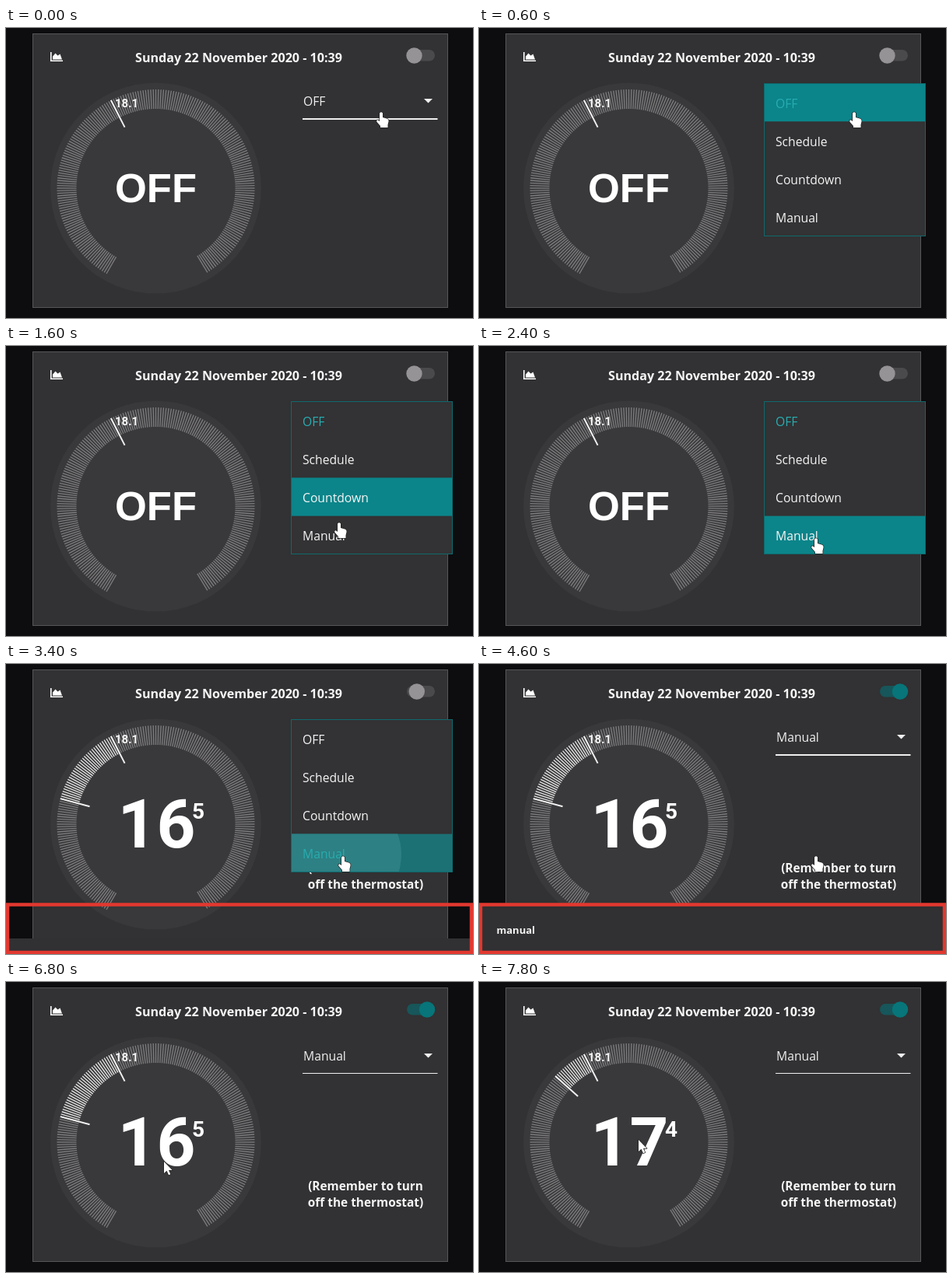
These frames come from a looping animation (600 by 373 pixels, 8 s). An HTML page with a canvas:

```html
<!DOCTYPE html>
<html lang="en">
<head>
<meta charset="utf-8">
<title>Thermostat</title>
<style>
html, body { margin: 0; height: 100%; overflow: hidden; background: #0d0c0e; }
canvas { display: block; width: 100vw; height: 100vh; }
</style>
</head>
<body>
<canvas id="stage" width="600" height="373"></canvas>
<script>
const ctx = document.getElementById('stage').getContext('2d');
const LOOP = 8000, STEP = 200;
const UI = '"Open Sans", sans-serif';
const LETTERS = '"Liberation Sans", Arial, sans-serif', DIGITS = 'Roboto, sans-serif';
const CX = 192.5, CY = 206;
const TICKS = 200, SWEEP = 300;
const AMBIENT = 18.1;
const ITEMS = ['OFF', 'Schedule', 'Countdown', 'Manual'];
const ROW = 49.2;

const HAND = new Path2D('M-2 1.5Q0-1 2 1.5V7L8 8.8Q9.8 9.6 9.6 12L8.5 16.5V20H-1V18L-5.6 12.8Q-6.4 10.4 -4.2 10.2L-2 12Z');
const ARROW = new Path2D('M0 0V15L3.5 11.8L6 17.3L8.4 16.2L6 11H10.6Z');
const CHART = new Path2D('M57 31h1.6v10.6H73V43H57ZM60 40.5V36.5L63.5 32.5L66.5 35.5L69.5 33.5L72 40.5Z');

// Pointer tip: time, x, y
const POINTER = [
  [0, 482, 108], [600, 482, 108], [800, 479, 124], [1000, 470, 150], [1200, 461, 173],
  [1400, 448, 199], [1600, 428, 227], [1800, 408, 246], [2200, 408, 246], [2400, 433, 247],
  [4600, 433, 247], [5200, 331, 249], [5600, 214, 231], [6000, 203, 231],
  [7200, 203, 231], [7800, 205, 203]
];

// Linear interpolation through [time, ...values] keys
function track(keys, t) {
  const next = keys.findIndex(k => k[0] > t);
  if (next < 0) return keys[keys.length - 1].slice(1);
  const a = keys[next - 1], b = keys[next], p = (t - a[0]) / (b[0] - a[0]);
  return a.slice(1).map((v, i) => v + (b[i + 1] - v) * p);
}

function text(str, x, y, font, color = '#f5f5f5', align = 'left') {
  ctx.font = font;
  ctx.fillStyle = color;
  ctx.textAlign = align;
  ctx.fillText(str, x, y);
}

function rect(x, y, w, h, color) {
  ctx.fillStyle = color;
  ctx.fillRect(x, y, w, h);
}

function disc(x, y, r, color) {
  ctx.fillStyle = color;
  ctx.beginPath();
  ctx.arc(x, y, r, 0, 7);
  ctx.fill();
}

function frame(x, y, w, h, width, color) {
  ctx.lineWidth = width;
  ctx.strokeStyle = color;
  ctx.strokeRect(x, y, w, h);
}

const tickOf = value => Math.round((value - 14) / 10 * TICKS);

function tick(index, inner, width, color) {
  const a = (index / TICKS - .5) * SWEEP * Math.PI / 180;
  const s = Math.sin(a), c = Math.cos(a);
  ctx.lineWidth = width;
  ctx.strokeStyle = color;
  ctx.beginPath();
  ctx.moveTo(CX + 127 * s, CY - 127 * c);
  ctx.lineTo(CX + inner * s, CY - inner * c);
  ctx.stroke();
}

function drawDial(value) {
  disc(CX, CY, 135.5, '#39383a');
  const to = tickOf(AMBIENT), from = value ? tickOf(value) : to;
  for (let i = 0; i < TICKS; i++) {
    tick(i, 102, 1.35, i >= from && i <= to ? '#e2e2e2' : '#7c7b7d');
  }
  tick(to, 88, 2, '#f0f0f0');
  if (value) tick(from, 88, 2, '#f0f0f0');
  text('18.1', 140, 102, `700 15px ${DIGITS}`);
  if (!value) {
    text('OFF', CX, 224, `700 52.5px ${LETTERS}`, '#fff', 'center');
    return;
  }
  const [whole, tenth] = value.toFixed(1).split('.');
  text(whole, CX + 1, 236, `700 87px ${DIGITS}`, '#fff', 'center');
  text(tenth, 239, 199, `700 28px ${DIGITS}`, '#fff');
}

function drawToggle(on) {
  ctx.fillStyle = on > .5 ? '#17565a' : '#4a494b';
  ctx.beginPath();
  ctx.roundRect(515, 28, 36, 14.5, 7.2);
  ctx.fill();
  disc(524.5 + 16.5 * on, 35.5, 10.2, on > .5 ? '#077579' : '#959395');
}

function drawSelect(label, focused) {
  const drop = focused ? 0 : 1;
  text(label, 382, 100 + drop, `500 15.7px ${UI}`, '#f0f0f0');
  ctx.fillStyle = '#f0f0f0';
  ctx.beginPath();
  ctx.moveTo(537, 91 + drop);
  ctx.lineTo(548, 91 + drop);
  ctx.lineTo(542.5, 96.5 + drop);
  ctx.fill();
  rect(381, focused ? 116 : 117, 173.5, focused ? 2 : 1, '#f0f0f0');
}

function drawMenu(alpha, hover, selected, clicked) {
  ctx.save();
  ctx.globalAlpha = alpha;
  rect(366, 71, 208, 197, '#333234');
  const top = 71 + hover * ROW;
  rect(366, top, 208, ROW, clicked ? '#1b7174' : '#0b858a');
  if (clicked) {
    ctx.save();
    ctx.beginPath();
    ctx.rect(366, top, 208, ROW);
    ctx.clip();
    disc(433, 245, 75, '#2d8083');
    ctx.restore();
  }
  frame(366.5, 71.5, 207, 196, 1, '#0e696d');
  ITEMS.forEach((item, i) => {
    text(item, 381, 102.5 + i * ROW, `500 15.7px ${UI}`, i === selected ? '#27adb1' : '#f5f5f5');
  });
  ctx.restore();
}

function drawToast(t) {
  const [top] = track([[3200, 373], [3400, 353], [3600, 326], [3800, 311], [4600, 311], [4800, 336], [5000, 373]], t);
  rect(0, top, 600, 373 - top, '#313032');
  text('manual', 22.5, top + 36, `700 13px ${UI}`);
  frame(2, 309.5, 596, 61.5, 4.5, '#e2382f');
}

function drawPointer(t, x, y) {
  ctx.save();
  ctx.translate(x, y);
  const shape = t < 4800 ? HAND : ARROW;
  ctx.lineWidth = 1.4;
  ctx.lineJoin = 'round';
  ctx.strokeStyle = '#222';
  ctx.stroke(shape);
  ctx.fillStyle = '#fff';
  ctx.fill(shape);
  ctx.restore();
}

function draw(t) {
  const manual = t >= 3400;
  const [x, y] = track(POINTER, t);

  rect(0, 0, 600, 373, '#0d0c0e');
  rect(34, 7, 534, 353, '#323133');
  frame(34.5, 7.5, 533, 352, 1, '#565557');
  ctx.fillStyle = '#fff';
  ctx.fill(CHART);
  text('Sunday 22 November 2020 - 10:39', 299, 43.5, `700 16.1px ${UI}`, '#f5f5f5', 'center');

  drawToggle(track([[0, 0], [3200, 0], [3400, .2], [3800, 1]], t)[0]);
  const [value] = track([[0, 16.5], [7200, 16.5], [7800, 17.4]], t);
  drawDial(manual ? value : null);
  drawSelect(manual ? 'Manual' : 'OFF', t < 6800);
  if (manual) {
    const font = `700 15.4px ${UI}`;
    text('(Remember to turn', 462, 268, font, '#f5f5f5', 'center');
    text('off the thermostat)', 462, 289, font, '#f5f5f5', 'center');
  }

  const [alpha] = track([[0, 0], [400, 1], [3400, 1], [3800, 0]], t);
  // The highlight trails the pointer by one step
  const [, hoverY] = track(POINTER, Math.max(0, t - STEP));
  const hover = Math.max(0, Math.min(3, Math.floor((hoverY - 71) / ROW)));
  if (alpha) drawMenu(alpha, hover, manual ? 3 : 0, manual);
  if (t >= 3400 && t < 5000) drawToast(t);
  drawPointer(t, x, y);
}

function loop() {
  const t = performance.now() % LOOP;
  draw(Math.floor(t / STEP) * STEP);
  requestAnimationFrame(loop);
}
loop();
</script>
</body>
</html>
```
